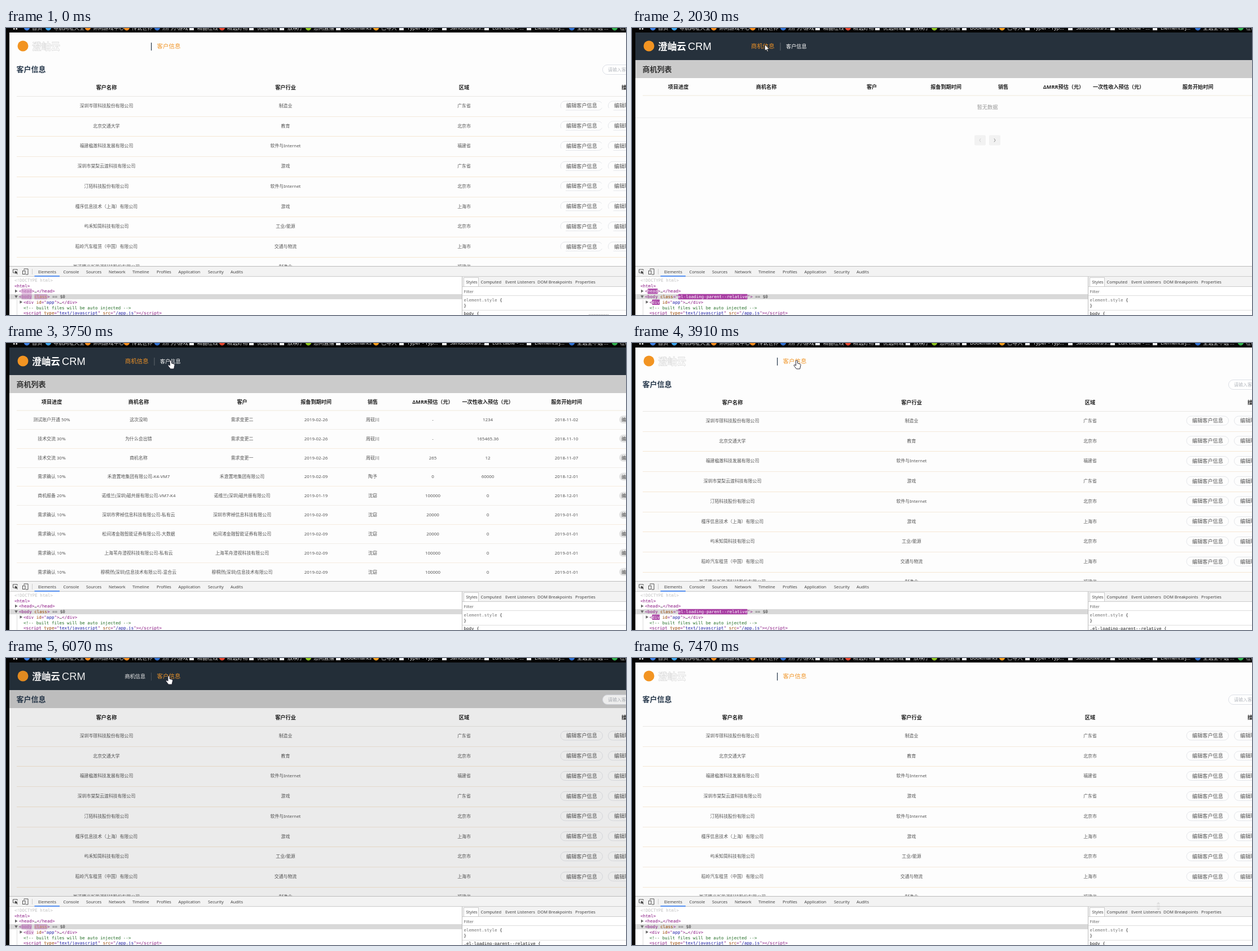
Write an HTML page that moves like this. It is 1099x510 px and loops after 7540 ms.

```html
<!DOCTYPE html>
<html lang="zh-CN">
<head>
<meta charset="utf-8">
<title>CRM</title>
<style>
html, body { margin: 0; width: 100%; height: 100%; overflow: hidden; background: #fdfdfd; }
svg { display: block; }
text { font-family: "Noto Sans", "Noto Sans CJK SC", "Noto Sans CJK JP", sans-serif; white-space: pre; }
.mono { font-family: "DejaVu Sans Mono", monospace; font-size: 7.54px; }
.pill { stroke-dasharray: var(--edge); }
</style>
</head>
<body>
<svg id="stage" width="1099" height="510" viewBox="0 0 1099 510"></svg>
<script>
const LOOP = 7540, CHAR = 4.54;
const esc = s => s.replace(/&/g, '&amp;').replace(/</g, '&lt;');
const rect = (x, y, w, h, fill, more = '') =>
  `<rect x="${x}" y="${y}" width="${w}" height="${h}" fill="${fill}" ${more}/>`;
// y is the vertical middle of the line
const text = (x, y, s, size, fill, more = '') =>
  `<text x="${x}" y="${y + size * .37}" font-size="${size}" fill="${fill}" ${more}>${esc(s)}</text>`;
const mid = (x, y, s, size, fill, more = '') => text(x, y, s, size, fill, 'text-anchor="middle" ' + more);
const group = (id, body) => `<g id="${id}">${body}</g>`;
const BOLD = 'font-weight="700"';

function bookmarks() {
  const items = [
    [32, '首页', '#3b7de0'], [70, '导航网址大全', '#3aa0e8'], [140, '休闲游戏中心', '#f08a1c'],
    [209, '传说世界', '#f08a1c'], [263, '热门小游戏', '#2f6fd0'], [325, '精品在线', '#eee'],
    [378, '精选好物', '#e2452f'], [431, '优选商城', '#eee'], [485, '放映厅', '#eee'],
    [531, '悠闲直播', '#8cc21f'], [585, 'Bookmarks', '#eee'], [651, '已导入', '#f09a1c'],
    [697, 'Typer - Typ...', '#eee'], [773, 'Sandboxes/s...', '#eee'], [848, 'Edit table - ...', '#eee'],
    [923, 'Elements/j...', '#eee'], [998, '全选全不选 ...', '#2f6fd0'], [1074, '在线工具', '#2fae4a']
  ];
  return rect(0, 0, 1099, 8, '#050505') + rect(0, 0, 6, 510, '#050505') +
    rect(13, 0, 2.5, 3, '#ccc') + rect(17.5, 0, 2.5, 3, '#ccc') +
    items.map(([x, s, c]) => (c === '#eee'
      ? rect(x, -5, 8, 9, c)
      : `<circle cx="${x + 5}" cy="-.5" r="5" fill="${c}"/>`) + text(x + 14, -.5, s, 9.2, '#ddd')).join('');
}

const logoMark = '<circle cx="30" cy="32" r="9.5" fill="#f29422"/>';
const brand = more => text(46, 32.5, '澄岫云', 16.7, '#fff', BOLD + ' ' + more);

const darkHeader = () => rect(6, 8, 1093, 49, '#26313c') + rect(6, 57, 1093, 32, '#cbcbcb') + logoMark + brand('') +
  text(99, 32.5, 'CRM', 18.4, '#fff', 'style="font-family:\'Liberation Sans\',sans-serif"');

const oppHeader = () => text(211, 32.5, '商机信息', 10.4, '#ec9127') + rect(262.5, 26, 1, 14, '#5f666d') +
  text(273, 32.5, '客户信息', 9.2, '#fff') + text(18.5, 73, '商机列表', 13, '#333', BOLD);

const custHeader = () => group('ghost', logoMark + brand('stroke="#dcdcdc" stroke-width=".8"') + rect(257, 26, 1.2, 14, '#26384c')) +
  group('custNav', text(210.5, 32.5, '商机信息', 9.2, '#fff') + rect(257, 26, 1, 14, '#4c545c')) +
  text(267.5, 32.5, '客户信息', 10.5, '#f0982e') + text(18.5, 73, '客户信息', 13, '#2a3b4e', BOLD);

function customers() {
  const rows = [
    ['深圳岑璟科技股份有限公司', '制造业', '广东省'], ['北京交通大学', '教育', '北京市'],
    ['福建楹澈科技发展有限公司', '软件与Internet', '福建省'], ['深圳市棠梨云渡科技有限公司', '游戏', '广东省'],
    ['汀陌科技股份有限公司', '软件与Internet', '北京市'], ['槿序信息技术（上海）有限公司', '游戏', '上海市'],
    ['屿禾知简科技有限公司', '工业/能源', '北京市'], ['稻岭汽车租赁（中国）有限公司', '交通与物流', '上海市'],
    ['岚溪穗光新能源科技股份有限公司', '制造业', '福建省']
  ];
  const xs = [178, 495.5, 812];
  const pill = (x, y) => rect(x, y - 8, 74.5, 16, 'none', 'rx="8" stroke="#e4e6ea" class="pill"');
  return rect(1057.5, 65.5, 90, 17, '#fff', 'rx="8.5" stroke="#dcdfe6"') + text(1067, 74, '请输入客户名称', 8, '#b4b8be') +
    ['客户名称', '客户行业', '区域'].map((s, i) => mid(xs[i], 106, s, 9.2, '#222', BOLD)).join('') +
    text(1091, 106, '操作', 9.2, '#222', BOLD) + rect(19, 121, 1080, 1, '#e9e7e4') +
    rows.map((r, i) => {
      const y = 138 + i * 35.75;
      return r.map((s, k) => mid(xs[k], y, s, 7.9, '#555')).join('') +
        rect(19, Math.round(156.5 + i * 35.75), 1080, 1, i % 2 ? '#f6e6d2' : '#f4e9dc') +
        (i < 8 ? pill(983, y) + pill(1067.5, y) + text(993, y, '编辑客户信息', 9.17, '#555') +
          text(1078, y, '编辑联系人', 9.17, '#555') : '');
    }).join('');
}

const oppHeads = ['项目进度', '商机名称', '客户', '报备到期时间', '销售', 'ΔMRR预估（元）', '一次性收入预估（元）', '服务开始时间'];
const heads = xs => xs.map((x, i) => mid(x, 105, oppHeads[i], 9.15, '#222', BOLD)).join('') +
  rect(19, 119.5, 1080, 1, '#f0ead9');

function oppEmpty() {
  const pager = (x, d, c) => rect(x, 190.5, 20, 18, '#f2f2f2', 'rx="2"') +
    `<path d="M${x + 10 - d} 196.5l${2 * d} 3l${-2 * d} 3" fill="none" stroke="${c}"/>`;
  return heads([82, 238, 425, 556.5, 658, 765, 862.5, 1003]) + mid(630, 140.5, '暂无数据', 9.2, '#999') +
    rect(6, 159, 1093, 1, '#ececec') + pager(607, -1, '#ccc') + pager(633, 1, '#888');
}

function oppData() {
  const xs = [81, 235, 418.5, 549.5, 650, 756.5, 854, 993.5];
  const a = '周砚川', b = '沈窈', need = '需求确认 10%', feb26 = '2019-02-26', feb9 = '2019-02-09', jan = '2019-01-01';
  const firm = (name, tag, sum, stage = need, due = feb9, start = jan) =>
    [stage, name + tag, name, due, b, sum, '0', start];
  const land = '禾澹置地集团有限公司';
  const rows = [
    ['测试账户开通 50%', '这次没哟', '需求变更二', feb26, a, '-', '1234', '2018-11-02'],
    ['技术交流 30%', '为什么会出错', '需求变更二', feb26, a, '-', '165465.36', '2018-11-10'],
    ['技术交流 30%', '商机名称', '需求变更一', feb26, a, '265', '12', '2018-11-07'],
    [need, land + '-K4-VM7', land, feb9, '陶予', '0', '60000', '2018-12-01'],
    firm('诺维兰(深圳)磁共振有限公司', '-VM7-K4', '100000', '商机报备 20%', '2019-01-19', '2018-12-01'),
    firm('深圳市霁棹信息科技有限公司', '-私有云', '20000'),
    firm('松间渚金融智能证券有限公司', '-大数据', '20000'),
    firm('上海苇舟澄视科技有限公司', '-私有云', '100000'),
    firm('穆桐然(深圳)信息技术有限公司', '-混合云', '100000')
  ];
  return heads(xs) + rows.map((r, i) => {
    const y = 136 + i * 33.85;
    return r.map((s, k) => mid(xs[k], y, s, 7.95, '#555')).join('') +
      rect(19, Math.round(153 + i * 33.8), 1080, 1, i % 2 ? '#f6ecdf' : '#f1ede8') +
      rect(1087, y - 7, 34, 14, '#e4e4e4', 'rx="7"') + text(1091, y, '编辑', 8, '#444');
  }).join('');
}

const TAG = '#881280', ATTR = '#994500', VAL = '#1a1aa6';
// parts: [string, colour, highlight name]
function mono(x, y, parts) {
  let n = 0;
  return parts.map(([s, fill, name]) => {
    const px = x + n * CHAR;
    n += s.length;
    return (name ? rect(px, y - 4.7, s.length * CHAR, 9.4, '#a83fa3', `rx="1" data-bg="${name}"`) : '') +
      `<text class="mono" x="${px}" y="${y + 2.5}" fill="${fill}" ${name ? `data-fg="${name}"` : ''}>${esc(s)}</text>`;
  }).join('');
}

function devtools() {
  const tabs = (list, y) => list.map(([x, s]) => text(x, y, s, 7.4, '#444')).join('');
  const tri = (x, y, d) => `<path transform="translate(${x} ${y})" d="${d}" fill="#666"/>`;
  const right = 'M-2-2.8L2.6 0L-2 2.8Z', down = 'M-2.8-2H2.8L0 2.6Z';
  const tail = [[' == ', '#555'], ['$0', '#333']];
  const open = [['<', TAG], ['body', TAG, 'body'], [' ', TAG]];
  return rect(6, 423.5, 1093, 87, '#fff') + rect(6, 423.5, 1093, 18.5, '#f3f3f3') + rect(6, 423, 1093, 1, '#bbb') +
    rect(6, 441, 1093, 1, '#ccc') + rect(50.5, 440, 44.5, 1.8, '#4a8af4') +
    '<path d="M20 435H12.5V429H20V431" fill="none" stroke="#555"/><path d="M15.5 431.5l5.5 2.2-2.2 1 2 2.3-1 .8-2-2.4-1.2 1.8Z" fill="#444"/>' +
    '<path d="M32 430V428H39V438H35" fill="none" stroke="#555"/>' + rect(29.5, 431.5, 4.5, 6, '#f3f3f3', 'stroke="#555"') +
    rect(46, 428, 1, 10, '#ccc') +
    tabs([[57, 'Elements'], [101.5, 'Console'], [142, 'Sources'], [182, 'Network'], [224, 'Timeline'], [267, 'Profiles'],
      [305.5, 'Application'], [358, 'Security'], [398, 'Audits']], 433) +
    rect(6, 473, 802, 9, '#d9d9d9') + rect(19, 483, 1, 27, '#ddd') +
    mono(15, 448.5, [['<!DOCTYPE html>', '#c0c0c0']]) + mono(15, 458, [['<html>', TAG]]) +
    tri(18, 467.5, right) + mono(23, 467.7, [['<', TAG], ['head', TAG, 'head'], ['>', TAG], ['…', '#333'], ['</head>', TAG]]) +
    tri(18, 477.3, down) +
    group('plain', mono(23, 477.5, [...open, ['class', ATTR, 'cls'], ['>', TAG], ...tail])) +
    group('loading', mono(23, 477.5, [...open, ['class', ATTR], ['="', TAG],
      ['el-loading-parent--relative', VAL, 'value'], ['">', TAG], ...tail])) +
    tri(26.5, 487, right) + mono(31, 487.3, [['<', TAG], ['div', TAG, 'div'], [' id', ATTR], ['="', TAG], ['app', VAL],
      ['">', TAG], ['…', '#333'], ['</div>', TAG]]) +
    mono(31, 497, [['<!-- built files will be auto injected -->', '#236e25']]) +
    mono(31, 506.8, [['<script', TAG], [' type', ATTR], ['="', TAG], ['text/javascript', VAL], ['"', TAG], [' src', ATTR],
      ['="', TAG], ['/app.js', VAL], ['"></' + 'script>', TAG]]) +
    rect(808, 442, 1, 68, '#bbb') + rect(809, 442, 290, 18, '#f3f3f3') + rect(809, 459, 290, 1, '#ccc') +
    rect(811.5, 443.5, 26, 16, '#fff', 'stroke="#ccc"') +
    tabs([[815.5, 'Styles'], [841.5, 'Computed'], [885, 'Event Listeners'], [942, 'DOM Breakpoints'], [1009, 'Properties']], 451.3) +
    text(811.5, 468, 'Filter', 7.3, '#666') + rect(809, 475, 290, 1, '#ddd') +
    mono(811.5, 483, [['element.style', '#777'], [' {', '#222']]) + mono(811.5, 493.5, [['}', '#222']]) +
    rect(809, 501, 290, 1, '#ddd') +
    group('ruleBody', mono(811.5, 507, [['body {', '#222']])) +
    group('ruleLoad', mono(811.5, 507, [['.el-loading-parent--relative {', '#222']])) +
    '<path id="link" d="M1033 509.5h36" stroke="#aaa" stroke-dasharray="2 1"/>';
}

document.getElementById('stage').innerHTML =
  rect(0, 0, 1099, 510, '#fdfdfd') + group('dark', darkHeader()) + group('oppTop', oppHeader()) +
  group('cust', custHeader() + customers()) + group('empty', oppEmpty()) + group('data', oppData()) +
  rect(6, 8, 1093, 416, '#000', 'id="mask"') + devtools() + bookmarks() +
  '<path id="resize" d="M933 434l-2.5 3h5ZM933 448l-2.5-3h5ZM930 439.5h6M930 442.5h6" fill="#ddd" stroke="#ddd" stroke-width=".8"/>' +
  '<path id="arrow" d="M0 0V11L2.6 8.6 4.4 12.6 6 12 4.3 8.1H7.8Z" fill="#fff" stroke="#111" stroke-width=".7"/>' +
  '<path id="hand" d="M-1.5 1.2Q0-.8 1.5 1.2V5.5L6 6.8Q7.2 7.4 7 9L5.6 15.5H-.5L-5 9.6Q-5 7.6-3 8.4L-1.5 9.6Z" fill="#fff" stroke="#2a2a38" stroke-width="1"/>';

const $ = id => document.getElementById(id);
const show = (id, on) => { $(id).style.display = on ? '' : 'none'; };
const within = (t, spans) => spans.some(([a, b]) => t >= a && t < b);

const darkSpans = [[1940, 3830], [3990, 4150], [4900, 5140], [5920, 6140]];
const oppSpans = [[1940, 3830], [4900, 5920]];
const emptySpans = [[1940, 2250], [4900, 5140]];
const loadSpans = [[1960, 2300], [3830, 3990], [4920, 5060], [5930, 6050]];
const ruleSpans = [[3850, 4070], [5960, 6140]];
const maskSpans = [[2100, 2400], [3990, 4150], [4960, 5120], [5930, 6095]];

// [start, strength, end]
const bodyFlash = [[0, .35, 850], [2300, .8, 3600], [3990, .8, 4440], [5060, 1, 5560], [6050, .35, 6930], [7240, .15, 7470]];
const flashes = {
  head: [[0, .35, 770], [1940, 1, 2800]],
  body: bodyFlash,
  cls: bodyFlash,
  value: [[0, 1, 1e6]],
  div: [[2000, 1, 2700], [3880, 1, 4440], [4900, 1, 5380], [5930, .25, 6400], [7240, .15, 7470]]
};

// pointer stops: [time, x, y, shape]
const stops = [
  [70, 750, 466, 'arrow'], [770, 452, 210, 'arrow'], [1250, 452, 210, 'arrow'], [1790, 236, 19, 'arrow'],
  [1940, 235.5, 29.5, 'arrow'], [2480, 235.5, 29.5, 'arrow'], [2650, 249, 29, 'hand'], [2970, 290, 30, 'hand'],
  [3600, 292, 30.5, 'hand'], [4150, 292, 30.5, 'hand'], [4440, 240, 32, 'hand'], [4750, 220.5, 33.5, 'hand'],
  [5220, 220.5, 33.5, 'hand'], [5600, 287, 32, 'hand'], [5700, 288.5, 31.5, 'hand'], [6160, 288.5, 31.5, 'arrow'],
  [6610, 941, 464, 'arrow'], [6790, 948, 506, 'arrow']
];

const mix = (from, to, k) => from + (to - from) * k;
const tint = (hex, k) => `rgb(${[1, 3, 5].map(i => Math.round(mix(parseInt(hex.substr(i, 2), 16), 255, k)))})`;
const marks = Object.keys(flashes).map(name => ({
  list: flashes[name],
  bg: document.querySelectorAll(`[data-bg=${name}]`),
  fg: [...document.querySelectorAll(`[data-fg=${name}]`)].map(el => ({ el, ink: el.getAttribute('fill') }))
}));

function movePointer(t) {
  show('arrow', false);
  show('hand', false);
  const next = stops.findIndex(s => s[0] > t);
  if (next < 1) return;
  const [a, x0, y0, shape] = stops[next - 1], [b, x1, y1] = stops[next];
  const p = (t - a) / (b - a), k = p * p * (3 - 2 * p);
  show(shape, true);
  $(shape).setAttribute('transform', `translate(${mix(x0, x1, k)} ${mix(y0, y1, k)})`);
}

function draw(t) {
  const opp = within(t, oppSpans), dark = within(t, darkSpans), empty = within(t, emptySpans);
  const loading = within(t, loadSpans), rule = within(t, ruleSpans);
  show('dark', dark);
  show('oppTop', opp && dark);
  show('cust', !opp);
  show('ghost', !dark);
  show('custNav', dark);
  show('empty', opp && empty);
  show('data', opp && !empty);
  show('plain', !loading);
  show('loading', loading);
  show('ruleLoad', rule);
  show('ruleBody', !rule);
  show('link', t < 1500);
  show('resize', t >= 6610);
  $('cust').style.setProperty('--edge', t < 1940 ? '66 9' : 'none');

  const m = maskSpans.find(([a, b]) => t >= a && t < b);
  $('mask').setAttribute('opacity', m ? .24 * (1 - Math.abs(2 * (t - m[0]) / (m[1] - m[0]) - 1)) : 0);

  for (const { list, bg, fg } of marks) {
    const f = list.find(([a, , b]) => t >= a && t < b);
    const k = f ? f[1] * (1 - (t - f[0]) / (f[2] - f[0])) : 0;
    bg.forEach(el => el.setAttribute('opacity', k));
    fg.forEach(({ el, ink }) => el.setAttribute('fill', tint(ink, k)));
  }
  movePointer(t);
}

const began = performance.now();
function tick() {
  draw((performance.now() - began) % LOOP);
  requestAnimationFrame(tick);
}
tick();
</script>
</body>
</html>
```
